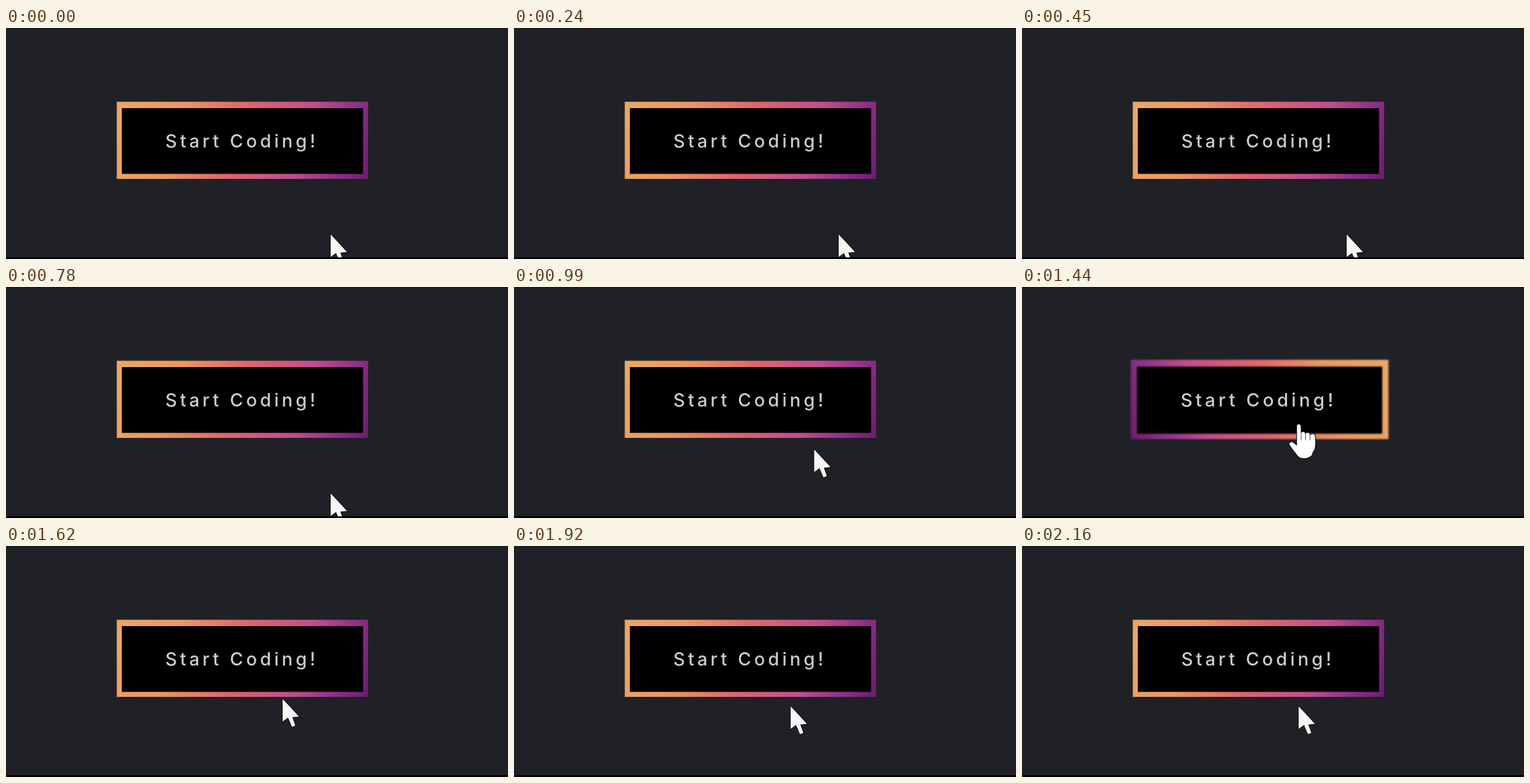
Write an HTML page with a canvas that moves like this. It is 750 by 346 pixels and loops after 2.19 s.

```html
<!DOCTYPE html>
<html lang="en">
<head>
<meta charset="utf-8">
<title>Gradient button</title>
<style>
  html, body { margin: 0; width: 100%; height: 100%; overflow: hidden; background: #202126; }
  canvas { display: block; }
</style>
</head>
<body>
<canvas id="stage" width="750" height="346"></canvas>
<script>
const ctx = document.getElementById('stage').getContext('2d');
const LOOP = 2190, ENTER = 1010, LEAVE = 1560;
const STOPS = [
  [0, '#eaa865'], [0.24, '#ec9762'], [0.48, '#e0656d'],
  [0.72, '#c34d90'], [0.88, '#8e3089'], [1, '#6b1c70']
];
const ARROW = new Path2D('M0 0 L0 34 L8 28 L14 42 L19 40 L14.5 27.5 L24.5 26.5 Z');
const HAND = new Path2D(
  'M-2.5 1 Q0 -3 3 1 L3.5 13 Q6 9 9.5 12 L10 14 Q13 10 16.5 13.5 L17 16' +
  ' Q20 11.5 24 15 Q26 26 24 36 L20 43 L20 45 Q15 50 8 50 Q0 50 -3 44' +
  ' Q-9 37 -14 29 Q-13 25 -9 26 L-2.5 31 Z');

const clamp = v => Math.min(1, Math.max(0, v));
const mix = (a, b, k) => a + (b - a) * k;
const span = (t, a, b) => clamp((t - a) / (b - a));
const inOut = p => p < 0.5 ? 4 * p ** 3 : 1 - 4 * (1 - p) ** 3;
const out = p => 1 - (1 - p) ** 2;

// Slanted gradient, mirrored while hovered
function paint(x, y, w, h, flip) {
  const slant = 0.3, len = (w + slant * h) / (1 + slant * slant);
  const x0 = flip ? x + w : x, dir = flip ? -1 : 1;
  const g = ctx.createLinearGradient(x0, y, x0 + dir * len, y + slant * len);
  STOPS.forEach(([at, color]) => g.addColorStop(at, color));
  return g;
}

function button(grow, hover) {
  const m = (a, b) => mix(a, b, grow);
  const x = m(165.5, 162.5), y = m(110.5, 109);
  const w = m(541, 547.5) - x, h = m(226, 227.8) - y;
  ctx.save();
  ctx.filter = `blur(${m(0.4, 0.9)}px)`; // soft screen-capture edges
  ctx.fillStyle = paint(x, y, w, h, hover);
  ctx.fillRect(x, y, w, h);

  const ix = m(173, 171.8), iy = m(120, 119.2);
  ctx.fillStyle = '#000';
  ctx.fillRect(ix, iy, m(533.5, 538.2) - ix, m(218.5, 219.8) - iy);

  ctx.filter = 'blur(0.4px)';
  ctx.translate(m(238, 237), 179);
  ctx.scale(m(1, 1.017), m(1, 1.017));
  ctx.font = '500 27px Inter, "Liberation Sans", sans-serif';
  ctx.letterSpacing = '4.5px';
  ctx.fillStyle = '#cfccca';
  ctx.fillText('Start Coding!', 0, 0);
  ctx.restore();
}

function cursor(x, y, hover) {
  const shape = hover ? HAND : ARROW;
  ctx.save();
  ctx.translate(x, y);
  ctx.lineJoin = 'round';
  ctx.lineWidth = 2;
  ctx.strokeStyle = '#08080a';
  ctx.stroke(shape);
  ctx.fillStyle = hover ? '#fff' : '#f6f5f4';
  ctx.fill(shape);
  if (hover) {
    ctx.lineWidth = 1;
    ctx.strokeStyle = '#55555a';
    ctx.beginPath();
    for (const fx of [3.7, 10.2, 17]) {
      ctx.moveTo(fx, 13);
      ctx.lineTo(fx, 23);
    }
    ctx.stroke();
  }
  ctx.restore();
}

function draw(t) {
  const hover = t >= ENTER && t < LEAVE;
  const grow = span(t, ENTER, ENTER + 60) - span(t, LEAVE, LEAVE + 50);
  const go = inOut(span(t, 840, 1140));
  const back = out(span(t, 1300, 1860));

  ctx.fillStyle = '#202126';
  ctx.fillRect(0, 0, 750, 346);
  ctx.fillStyle = '#121317';
  ctx.fillRect(0, 0, 750, 1);
  button(grow, hover);
  cursor(mix(485, 413.3, go), mix(309, 180, go) + 60 * back, hover);
  ctx.fillStyle = '#000';
  ctx.fillRect(0, 343.5, 750, 2.5);
}

const start = performance.now();
function tick() {
  draw((performance.now() - start) % LOOP);
  requestAnimationFrame(tick);
}
tick();
</script>
</body>
</html>
```
